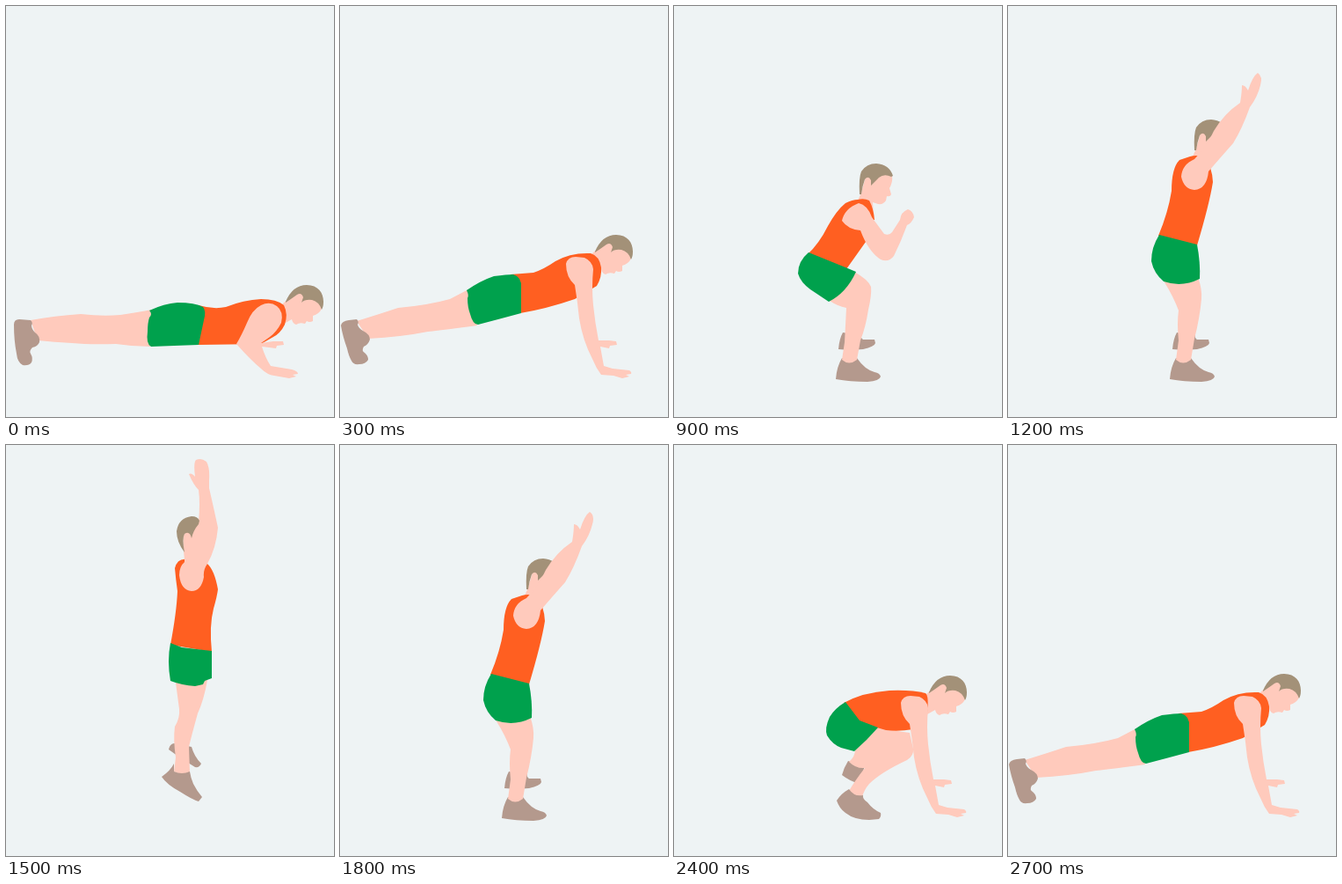
An HTML page for the animation above (3 s loop, 373 by 467 pixels).

```html
<!DOCTYPE html>
<html lang="en">
<head>
<meta charset="utf-8">
<title>Burpee</title>
<style>
html, body { margin: 0; width: 100%; height: 100%; overflow: hidden; background: #eef3f4; }
svg { display: block; width: 100%; height: 100%; }
.skin { fill: #ffcabc; }
.hair { fill: #a39178; }
.top { fill: #ff5f21; }
.shorts { fill: #00a14d; }
.shoe { fill: #b4998d; }
.pose { visibility: hidden; }
</style>
</head>
<body>
<svg viewBox="0 0 373 467">
<defs>
  <g id="headDown">
    <path class="skin" d="M286 284L300 271L320 268L332 282L331 289Q328 295 321 297L321 303Q317 305 314 303L312 306Q306 304 302 307Q298 306 297 301L288 306Z"/>
    <path class="hair" d="M290 281Q298 262 314 262C327 262 333 271 333 281Q333 287 331 290Q328 281 320 279Q312 278 308 282L310 276Q308 270 303 273Q296 278 290 282Z"/>
  </g>
  <g id="headUp">
    <path class="skin" d="M213 212L218 194L240 188L248 193Q249 200 245 207L247 214Q246 217 242 216L241 221Q238 226 232 225L226 223L227 238L206 228Z"/>
    <path class="hair" d="M211 214Q210 195 213 188Q219 179 230 179Q245 180 249 193L247 194Q239 190 233 195L224 204L224 198Q221 192 217 197Q214 205 213 214Z"/>
  </g>
  <path id="armDown" class="skin" d="M258 293Q260 285 269 285L279 286Q288 290 289 299Q287 320 289 340Q291 360 295 380L307 380L315 381L316 385L308 386L307 389L297 387L301 409L311 412L330 414Q333 416 332 418L326 419L330 421L322 423L312 420L298 419Q292 411 288 401Q277 380 273 355Q271 335 268 317Q258 308 258 293Z"/>
  <g id="feet">
    <path class="shoe" d="M192 371Q188 378 187 390Q200 391 215 390Q228 387 229 383L228 379L215 379Q212 377 213 374Z"/>
    <path class="shoe" d="M191 400Q185 410 184 424Q200 427 220 427Q234 426 235 421Q234 417 228 416Q217 413 208 400Z"/>
  </g>
</defs>

<g class="pose">
  <path class="skin" d="M28 357Q55 352 85 350Q110 353 130 351Q150 348 166 345L164 387Q145 387 125 384Q95 385 75 383Q55 382 36 380Z"/>
  <path class="shoe" d="M9 362Q9 356 15 356L28 357Q31 360 29 363Q29 367 33 371Q39 375 38 382Q36 387 30 388Q26 392 28 395Q31 400 29 405Q26 409 19 408Q13 405 12 395Q9 380 9 362Z"/>
  <use href="#headDown" x="28" y="55"/>
  <path class="top" d="M219 340Q236 345 250 342Q270 334 290 333Q308 333 316 340Q321 350 317 362Q312 372 304 376L290 384L219 385Z"/>
  <path class="shorts" d="M163 346Q180 338 195 337Q215 337 224 342Q228 346 225 357L219 385Q190 386 165 387Q159 384 161 370Q161 360 163 354Q167 350 163 346Z"/>
  <path class="skin" d="M262 384Q268 374 274 360Q280 345 290 340Q300 335 308 341Q316 347 313 360Q308 370 300 376L290 383L304 381L315 381L316 385L308 386L307 389L291 387Q295 400 301 409L325 413Q332 415 332 418L326 419L330 421L322 423L305 420Q297 419 290 412Q278 402 262 384Z"/>
</g>

<g class="pose">
  <path class="skin" d="M19 358Q45 350 66 343Q100 340 125 333L146 322L156 363Q120 368 100 370Q70 376 32 378Z"/>
  <path class="shoe" d="M1 363Q2 358 10 357L19 356Q22 359 20 362Q21 366 26 369Q34 373 34 379Q32 385 27 387Q24 392 28 394Q32 397 32 402Q29 407 22 407Q15 408 13 403Q10 398 8 389Q3 375 1 363Z"/>
  <use href="#headDown" y="-2"/>
  <path class="top" d="M194 305L220 303Q232 299 245 290Q262 280 285 281Q295 284 297 297Q298 308 292 318L267 333Q235 344 205 349Z"/>
  <path class="shorts" d="M144 323Q160 312 175 307Q190 305 197 305Q207 308 206 320L206 349Q180 356 157 362Q151 362 148 350Q145 342 145 332Q147 329 144 323Z"/>
  <use href="#armDown" x="-1"/>
</g>

<g class="pose">
  <path class="shoe" d="M198 359Q193 367 191 375Q200 382 211 385L216 379Q213 374 217 365Z"/>
  <path class="skin" d="M206 346L230 319Q250 325 268 327L272 345Q273 353 265 358Q235 372 222 385Q216 392 214 400Q204 400 199 393Q206 381 217 367Q207 368 199 360Q206 354 206 346Z"/>
  <path class="shoe" d="M199 391Q190 396 185 404Q188 413 195 418Q205 426 222 426L233 425Q236 422 235 418Q226 414 220 406Q214 402 215 398Q205 400 199 391Z"/>
  <use href="#headDown"/>
  <path class="top" d="M193 293Q215 281 245 279Q270 278 286 282Q290 285 288 304L272 323Q255 326 241 324L210 315Z"/>
  <path class="shorts" d="M195 292Q183 299 177 309Q171 322 174 330Q180 340 190 344L205 348Q220 335 232 321L211 313Z"/>
  <use href="#armDown"/>
</g>

<g class="pose">
  <use href="#feet"/>
  <path class="skin" d="M205 302Q221 311 224 319Q225 328 221 345Q218 365 212 380L208 402Q199 409 191 402L194 382L196 343Q186 341 177 335Z"/>
  <use href="#headUp"/>
  <path class="top" d="M209 220Q216 218 222 221Q227 230 228 243L216 244L218 268L196 299L152 282Q165 270 175 250Q185 232 195 224Q203 220 209 220Z"/>
  <path class="shorts" d="M153 280Q141 290 141 304Q144 314 155 322L176 336Q196 326 207 302L195 297Z"/>
  <path class="skin" d="M210 224Q220 226 225 240L239 259Q245 261 248 257L257 243Q258 234 266 231Q272 233 273 240Q270 247 265 249Q258 268 250 284Q244 292 235 288Q221 279 212 255Q198 254 191 244Q194 230 210 224Z"/>
</g>

<g class="pose">
  <use href="#feet"/>
  <path class="skin" d="M176 310L216 308Q221 322 220 333Q218 355 212 378L208 402Q199 409 191 402L194 380Q192 360 194 346Q188 330 178 314Z"/>
  <use href="#headUp" x="1" y="-50"/>
  <path class="top" d="M207 171Q216 168 224 173Q232 182 233 200Q229 225 215 272L171 261Q182 235 186 210Q186 184 195 175Z"/>
  <path class="shorts" d="M172 260Q163 274 163 290Q166 304 177 313Q198 320 218 310Q219 292 215 271Z"/>
  <path class="skin" d="M197 194Q198 180 212 174Q226 160 234 142Q246 122 264 110Q266 98 266 90Q270 90 273 96Q278 80 284 76Q290 80 287 90Q284 103 275 115Q266 140 256 156Q240 174 228 188Q226 208 212 209Q200 208 197 194Z"/>
</g>

<g class="pose">
  <path class="shoe" d="M191 339Q186 340 185 346L199 356L215 366Q220 367 222 362Q214 354 211 343Z"/>
  <path class="skin" d="M193 270L229 267Q225 290 218 305Q211 330 208 343L209 372Q200 376 191 371L193 355Q190 335 192 320Q198 310 197 300Z"/>
  <path class="shoe" d="M191 362Q187 370 177 377Q183 386 198 394Q212 403 219 405L223 400Q217 393 213 385Q210 378 209 371Q200 375 191 371Z"/>
  <path class="top" d="M206 130Q195 128 192 140Q193 152 195 166Q194 190 187 227L234 235Q231 205 236 186Q240 172 241 164Q237 142 229 135Z"/>
  <path class="shorts" d="M187 225Q183 245 187 268Q200 273 215 274L224 272L226 268L234 265L234 234L200 230Z"/>
  <path class="skin" d="M203 130Q200 105 203 100L212 92L219 88Q221 65 219 51Q213 45 208 33Q211 31 215 36Q213 20 216 17Q222 14 228 19Q232 26 231 40L231 49Q237 75 241 94Q239 117 229 135Q224 142 225 150Q222 166 211 166Q199 165 197 148Q197 138 203 133Z"/>
  <path class="hair" d="M203 122Q194 110 194 98Q196 83 211 81Q218 81 220 86L219 90Q213 97 211 106Q209 97 203 101Q200 106 203 122Z"/>
</g>
</svg>
<script>
const poses = document.querySelectorAll(".pose");
const order = [0, 1, 2, 3, 4, 5, 4, 3, 2, 1];
const start = performance.now();

function draw() {
  const step = Math.floor((performance.now() - start) / 300) % order.length;
  poses.forEach((pose, i) => {
    pose.style.visibility = i === order[step] ? "visible" : "hidden";
  });
  requestAnimationFrame(draw);
}
draw();
</script>
</body>
</html>
```
